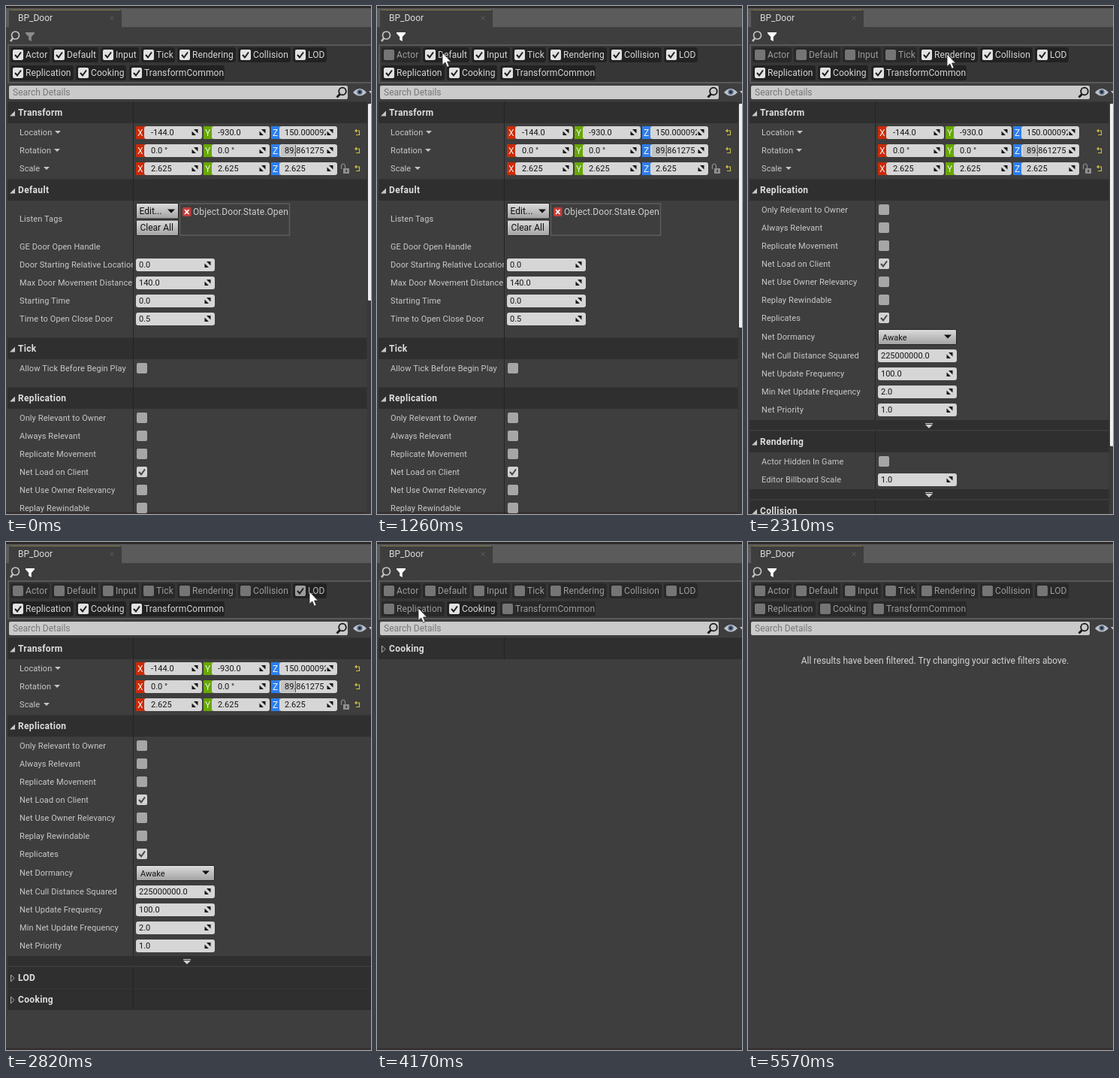
Write an HTML page that moves like this. It is 486 px wide and 676 px high and loops after 5690 ms.

```html
<!DOCTYPE html>
<html lang="en">
<head>
<meta charset="utf-8">
<title>Details panel filters</title>
<style>
html, body { margin: 0; width: 100%; height: 100%; overflow: hidden; background: #3e3e3e; }
svg { display: block; width: 486px; height: 676px; font: 12px Roboto, sans-serif; }
text { white-space: pre; }
.row { font-size: 11px; letter-spacing: .1px; fill: #c9c9c9; }
.val { font-size: 11px; fill: #141414; }
.head { font-weight: 700; letter-spacing: .33px; fill: #dedede; }
.chip { letter-spacing: .1px; }
</style>
</head>
<body>
<svg viewBox="0 0 486 676">
  <defs>
    <linearGradient id="btn" x2="0" y2="1">
      <stop stop-color="#dcdcdc"/><stop offset="1" stop-color="#a2a2a2"/>
    </linearGradient>
    <clipPath id="view"><path d="M0 126H486V676H0Z"/></clipPath>
    <clipPath id="labels"><path d="M0 126H169V676H0Z"/></clipPath>
    <clipPath id="zField"><path d="M364 126H426V676H364Z"/></clipPath>
  </defs>
  <path fill="#3e3e3e" d="M0 0H486V676H0Z"/>
  <path fill="#5b5b5b" d="M0 3H486V28H0Z"/>
  <path fill="#2a2627" d="M0 0H486V2.5H0Z"/>
  <path fill="#3e3e3e" d="M4 28V7Q4 5 6 5H152Q154 5 154 7V28Z"/>
  <path stroke="#77713f" d="M6 5.5H152"/>
  <text x="16" y="20" fill="#dcdcdc">BP_Door</text>
  <path stroke="#5c5c5c" d="M138.500 13.500L143.500 18.500M143.500 13.500L138.500 18.500"/>
  <g fill="none" stroke="#c4c4c4" stroke-width="1.700">
    <circle cx="12.500" cy="39" r="5"/><path stroke-width="2.500" d="M9 43L6 47"/>
  </g>
  <path id="funnel" d="M26 35H38V36.500L33.800 41V47L30.200 45V41L26 36.500Z"/>
  <path fill="#363636" stroke="#595959" stroke-width="2" d="M490 52H3V102H490"/>
  <g id="chips"></g>
  <rect x="4" y="106" width="451" height="18" rx="2" fill="#cacaca"/>
  <text x="9" y="119" fill="#777">Search Details</text>
  <g fill="none" stroke="#151515" stroke-width="1.800">
    <circle cx="448" cy="113.500" r="4.800"/><path stroke-width="2.800" d="M444.500 117.500L440.500 121.500"/>
  </g>
  <path fill="#bcc3cf" d="M462 115Q471 105 480 115Q471 124 462 115Z"/>
  <circle cx="471" cy="114.500" r="3.600" fill="#5b6d84"/><circle cx="471" cy="114.500" r="1.700" fill="#1d2530"/>
  <path fill="#cfcfcf" d="M483 113H490L486.500 117Z"/>
  <path fill="#342f31" d="M0 673.500H486V676H0Z"/>
  <g id="list" clip-path="url(#view)"></g>
  <path id="cursor" fill="#fff" stroke="#222" stroke-width=".8" d="M0 0V16.500L3.800 13L6.500 19.300L9.200 18.200L6.600 12H11.500Z"/>
</svg>
<script>
const LOOP = 5690;
const $ = id => document.getElementById(id);

// Filters: name, x, row, order in which they are switched off, width
const chips = [
  ['Actor', 6, 0, 1, 52], ['Default', 61, 0, 2, 62], ['Input', 126, 0, 3, 51], ['Tick', 180, 0, 4, 45],
  ['Rendering', 228, 0, 5, 78], ['Collision', 309, 0, 6, 70], ['LOD', 382, 0, 7, 45],
  ['Replication', 6, 1, 9, 84], ['Cooking', 93, 1, 10, 67], ['TransformCommon', 164, 1, 8, 127]
];

// time, cursor x, cursor y, filters switched off (a half: the next one is held down)
const steps = [
  [0, -40, 0, 0], [400, 1, 85, 0], [550, 20, 72, 0], [680, 33, 64, 0], [810, 33, 64, 1],
  [1110, 87, 62, 1], [1380, 87, 62, 2], [1500, 120, 66, 2], [1620, 150, 64, 2], [1770, 150, 64, 3],
  [1890, 180, 63, 3], [2010, 203, 62, 3], [2160, 203, 62, 4], [2310, 265, 64, 4], [2430, 265, 64, 5],
  [2580, 335, 64, 5], [2700, 335, 64, 6], [2820, 404, 66, 6.5], [3090, 300, 84, 7], [3240, 215, 85, 7],
  [3360, 215, 85, 8], [3480, 162, 84, 8], [3630, 130, 84, 8], [3750, 95, 84, 8], [3900, 55, 86, 8],
  [4050, 55, 88, 9], [4290, 115, 88, 9], [4410, 115, 88, 10], [4530, 127, 94, 10],
  [4650, 232, 250, 10], [4770, 364, 541, 10], [4890, -40, 0, 10]
];

const text = (cls, x, y, s, extra = '') => `<text class="${cls}" x="${x}" y="${y}" ${extra}>${s}</text>`;
const rect = (x, y, w, h, fill, extra = '') =>
  `<rect x="${x}" y="${y}" width="${w}" height="${h}" fill="${fill}" ${extra}/>`;
const path = (d, fill, extra = '') => `<path d="${d}" fill="${fill}" ${extra}/>`;
const down = (x, y, r, fill) => path(`M${x - r} ${y - r / 2}h${2 * r}l${-r} ${r}Z`, fill);
const tick = (x, y, color) =>
  path(`M${x - 4} ${y}l3 3.500l5 -7`, 'none', `stroke="${color}" stroke-width="2"`);

const label = (y, s) => text('row', 18, y + 4, s, 'clip-path="url(#labels)"');

// A numeric box; slide is the width of its filled part
function field(x, y, w, s, pad = 4, extra = '', slide = 0) {
  const sx = x + w - 9.5;
  return rect(x, y - 8, w, 17, '#d6d6d6', 'rx="3"') +
    (slide ? rect(x + 2, y - 7, slide, 15, '#c2c2c2') + rect(x + 1 + slide, y - 7, 1, 15, '#555') : '') +
    text('val', x + pad, y + 4, s, extra) +
    path(`M${sx + 4} ${y - 4}v5.500l-5.500 -5.500ZM${sx - 4} ${y + 4}v-5.500l5.500 5.500Z`, '#141414');
}

function checkbox(y, on) {
  return rect(174, y - 7, 14, 14, on ? '#d2d2d2' : '#a6a6a6', 'rx="2"') + (on ? tick(181, y, '#444') : '');
}

const button = (x, y, w, h, s, pad, cls) =>
  rect(x, y, w, h, 'url(#btn)', 'rx="1.500" stroke="#262626"') +
  text(cls, x + pad, y + h / 2 + 4, s, 'fill="#111"');

const flag = on => (y, s) => label(y, s) + checkbox(y, on);
const number = v => (y, s) => label(y, s) + field(173, y, 105, v);
const off = flag(false), on = flag(true);
const combo = (y, s) => label(y, s) + button(173.5, y - 9.5, 104, 20, 'Awake', 5.5, 'val') + down(266, y, 5, '#111');

function vector(values, { slide = 0, lock = false } = {}) {
  const axes = [['X', 173, '#cc2a06', 9], ['Y', 263, '#68a800', 8], ['Z', 353, '#2c7eed', 7]];
  return (y, s) => {
    let out = label(y, s) + down(s[0] === 'S' ? 54 : s[0] === 'R' ? 68 : 69, y, 4, '#c4c4c4');
    axes.forEach(([a, x, color, pad], i) => {
      const z = i === 2;
      out += rect(x, y - 8, 12, 17, color) +
        text('', x + 2, y + 4.5, a, 'fill="#eee"') +
        field(x + 11, y, 77, values[i], pad, z ? 'clip-path="url(#zField)"' : '', z ? slide : 0);
    });
    if (lock) out += rect(449, y, 8, 7, '#8f8f8f') + rect(452.5, y + 2, 1.5, 3, '#333') +
      path(`M446.500 ${y + 1}v-5q2.500 -4 5 0v4`, 'none', 'stroke="#8f8f8f" stroke-width="1.200"');
    return out + path(`M467 ${y - 2}h3.500v5.500h-4.500`, 'none', 'stroke="#cfc148" stroke-width="1.100"') +
      path(`M464 ${y - 2}l3 -2.500v5Z`, '#cfc148');
  };
}

const tags = (y, s) => label(y, s) +
  button(173.5, y - 20.5, 56, 20.5, 'Edit...', 4, '') + down(220, y - 10, 5, '#111') +
  button(173.5, y + 2, 56, 20.5, 'Clear All', 5, '') +
  rect(231.5, y - 20, 146, 42, 'none', 'stroke="#5d5d5d" stroke-width="1.500"') +
  rect(235, y - 15, 11.5, 12, '#c23c38', 'rx="1.500"') +
  path(`M238 ${y - 12}l5.500 6m0 -6l-5.500 6`, 'none', 'stroke="#fff" stroke-width="1.800"') +
  text('chip', 249, y - 5, 'Object.Door.State.Open', 'fill="#cfcfcf"');

// Sections: filter, height, rows of [offset, label, draw], expander
const sections = [
  ['Transform', 103, [
    [26.5, 'Location', vector(['-144.0', '-930.0', '150.000092'])],
    [50.5, 'Rotation', vector(['0.0 °', '0.0 °', '89.861275'], { slide: 20 })],
    [74.5, 'Scale', vector(['2.625', '2.625', '2.625'], { lock: true })]]],
  ['Default', 211, [
    [38.5, 'Listen Tags', tags],
    [75.5, 'GE Door Open Handle', label],
    [99.5, 'Door Starting Relative Location', number('0.0')],
    [123.5, 'Max Door Movement Distance', number('140.0')],
    [147.5, 'Starting Time', number('0.0')],
    [171.5, 'Time to Open Close Door', number('0.5')]]],
  ['Tick', 66, [[26.5, 'Allow Tick Before Begin Play', off]]],
  ['Replication', 335, [
    [26.5, 'Only Relevant to Owner', off],
    [50.5, 'Always Relevant', off],
    [74.5, 'Replicate Movement', off],
    [98.5, 'Net Load on Client', on],
    [122.5, 'Net Use Owner Relevancy', off],
    [146.5, 'Replay Rewindable', off],
    [170.5, 'Replicates', on],
    [195.5, 'Net Dormancy', combo],
    [220.5, 'Net Cull Distance Squared', number('225000000.0')],
    [244.5, 'Net Update Frequency', number('100.0')],
    [268.5, 'Min Net Update Frequency', number('2.0')],
    [292.5, 'Net Priority', number('1.0')]], true],
  ['Rendering', 92, [
    [26.5, 'Actor Hidden In Game', off],
    [50.5, 'Editor Billboard Scale', number('1.0')]], true],
  ['Collision', 66, [[26.5, 'Generate Overlap Events During Level Streaming', off]]],
  ['Input', 69, [[26.5, 'Auto Receive Input', label]]],
  ['Actor', 138, [[26.5, 'Can be Damaged', on]]],
  ['LOD', 29, []],
  ['Cooking', 29, []]
];

function drawSection([name, h, rows, more], y) {
  const open = rows.length > 0;
  let out = rect(2, y - 14.5, 484, 29, '#2f2f2f') + rect(2, y - 14.5, 484, 1, '#353535') +
    rect(169, y - 14.5, 1, more ? h - 14 : h, '#242424') +
    (open ? path(`M5 ${y + 5}h7v-7Z`, '#c8c8c8')
          : path(`M6.500 ${y - 3.5}l4.500 4.500l-4.500 4.500Z`, 'none', 'stroke="#b0b0b0"')) +
    text('head', 16, y + 4.5, name);
  rows.forEach(([dy, s, draw]) => out += draw(y + dy, s));
  if (more) {
    const by = y + h - 28.5;
    out += rect(2, by, 484, 13, '#2f2f2f') + rect(236, by + 4, 10, 1, '#d0d0d0') +
      down(241, by + 8.5, 5, '#d0d0d0');
  }
  return out;
}

function drawChip([name, x, row, order, w], n) {
  const y = 55 + row * 24, lit = order > n, held = lit && order - n < 1;
  const box = held ? '#9c9c9c' : lit ? '#e2e2e2' : '#757575';
  const ink = held ? '#b8b8b8' : lit ? '#d6d6d6' : '#9c9c9c';
  return rect(x, y, w, 20, lit ? '#222' : '#292929', 'rx="3"') +
    rect(x + 3, y + 3, 14, 14, box, 'rx="2"') +
    (lit ? tick(x + 10, y + 10, '#1c1c1c') : '') +
    text('chip', x + 20, y + 14, name, `fill="${ink}"`);
}

function drawPanel(n) {
  $('funnel').setAttribute('fill', n ? '#fff' : '#8b8b8b');
  $('chips').innerHTML = chips.map(c => drawChip(c, n)).join('');
  const live = chips.filter(c => c[3] > n).map(c => c[0].replace('Common', ''));
  let y = 141.5, total = 0, out = '';
  for (const s of sections) {
    if (!live.includes(s[0])) continue;
    if (y < 700) out += drawSection(s, y);
    y += s[1];
    total += s[1];
  }
  if (total > 546) {
    out += rect(480.5, 127, 6, 549, '#393939') + rect(482, 130, 6, 546 * 546 / total, '#efefef', 'rx="1.500"');
  }
  if (!total) out = text('', 249, 162, 'All results have been filtered. Try changing your active filters above.',
    'fill="#d4d4d4" text-anchor="middle"');
  $('list').innerHTML = out;
}

let shown = -1;
function render(time) {
  const t = time % LOOP;
  const [, x, y, n] = steps.filter(s => s[0] <= t).pop();
  if (n !== shown) drawPanel(shown = n);
  $('cursor').setAttribute('transform', `translate(${x} ${y})`);
}

const start = performance.now();
function loop() {
  render(performance.now() - start);
  requestAnimationFrame(loop);
}
loop();
</script>
</body>
</html>
```
